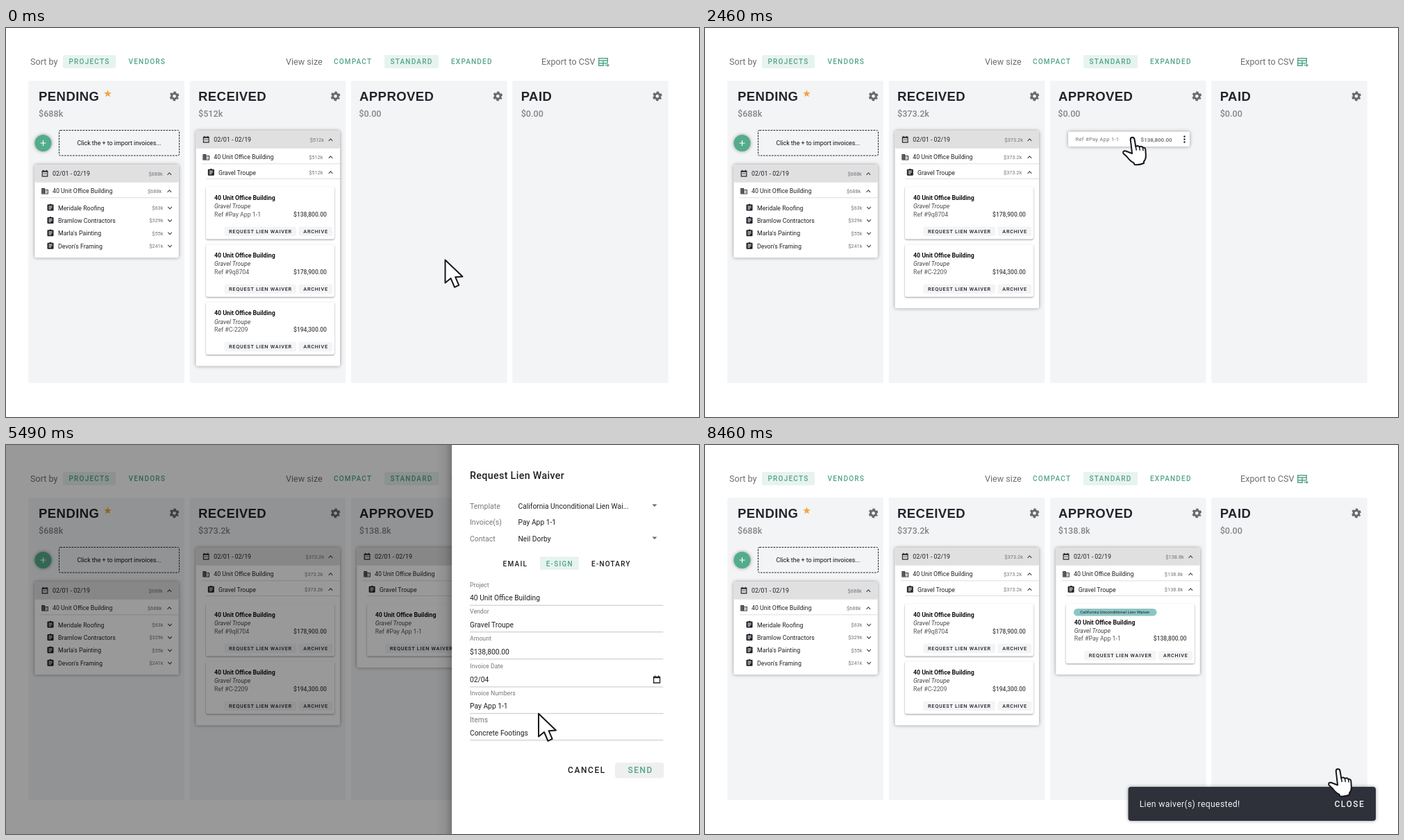
Write an HTML page that moves like this. It is 998 px wide and 561 px high and loops after 8580 ms.

```html
<!DOCTYPE html>
<html lang="en">
<head>
<meta charset="utf-8">
<title>Invoice board</title>
<style>
  html, body { margin: 0; width: 100%; height: 100%; overflow: hidden; background: #fff; }
  svg { display: block; width: 998px; height: 561px; font-family: Roboto, Arial, sans-serif; }
  text { white-space: pre; }
  .head { font-family: "Liberation Sans", Arial, sans-serif; }
  .lift { filter: drop-shadow(0 .5px 2.5px #0006); }
  .card { filter: drop-shadow(0 1px 1px #0006); }
</style>
</head>
<body>
<svg id="stage" viewBox="0 0 998 561"></svg>
<script>
const LOOP = 8580, GREEN = '#52a584', INK = '#202126', GRAY = '#85868a', DIM = '#747579';
const CREW = 'Gravel Troupe', PROJECT = '40 Unit Office Building';

// y is the middle of the capitals
const text = (x, y, s, size, fill = INK, attrs = '') =>
  `<text x="${x}" y="${y + size * .355}" font-size="${size}" fill="${fill}" ${attrs}>${s}</text>`;
const medium = 'font-weight="500"', bold = 'font-weight="700"', end = 'text-anchor="end"';
const caps = (x, y, s, size, fill, gap) =>
  text(x, y, s, size, fill, `${medium} letter-spacing="${gap}"`);
const rect = (x, y, w, h, fill, attrs = '') =>
  `<rect x="${x}" y="${y}" width="${w}" height="${h}" fill="${fill}" ${attrs}/>`;
const path = (d, stroke, width = 1, attrs = '') =>
  `<path d="${d}" fill="none" stroke="${stroke}" stroke-width="${width}" ${attrs}/>`;
const group = (id, body, attrs = '') => `<g id="${id}" ${attrs}>${body}</g>`;

// Icons live on a 24 unit grid
const icon = (x, y, size, body) =>
  `<g transform="translate(${x - size / 2} ${y - size / 2}) scale(${size / 24})">${body}</g>`;
const calendar = (x, y) => icon(x, y, 11.5,
  path('M4 5h16v16H4zM4 7h16M7 2v4M17 2v4M7 13h2.2m1.6 0h2.2m1.6 0h2.2', INK, 2.4));
const building = (x, y) => icon(x, y, 11.5,
  `<path d="M2 3h10v4h10v14H2z" fill="${INK}"/>` + rect(12, 9, 8, 10, '#fff') +
  path('M5 5v15M9 5v15', '#fff', 2, 'stroke-dasharray="2"') +
  path('M12 12h2m-2 4h2m2-4h2m-2 4h2', INK, 2));
const clipboard = (x, y) => icon(x, y, 12,
  rect(3, 3, 18, 18, INK, 'rx="2"') + `<circle cx="12" cy="4" r="3" fill="${INK}"/>` +
  path('M7 8h10M7 12h10M7 16h7', '#fff', 2));
const chevron = (x, y, dir = 1) =>
  path(`M${x - 2.8} ${y + 1.5 * dir}l2.8 ${-3 * dir}l2.8 ${3 * dir}`, '#44454a', 1.1);
const gear = x =>
  `<circle cx="${x}" cy="98.3" r="3.9" fill="none" stroke="#696a6d" stroke-width="3"/>` +
  `<circle cx="${x}" cy="98.3" r="5.6" fill="none" stroke="#696a6d" stroke-width="2.6"
    stroke-dasharray="3.2 2.664" stroke-dashoffset="1.6" transform="rotate(30 ${x} 98.3)"/>`;
const star = (x, y, r) => {
  const points = Array.from({ length: 10 }, (_, i) => {
    const a = i * Math.PI / 5, k = i % 2 ? r * .42 : r;
    return `${x + k * Math.sin(a)},${y - k * Math.cos(a)}`;
  });
  return `<polygon points="${points.join(' ')}" fill="#f3a640"/>`;
};

function toolbar() {
  const label = (x, s) => text(x, 48.6, s, 12.6, '#6d6e72');
  const option = (x, s) => caps(x, 48.8, s, 10, GREEN, 1.22);
  return label(35, 'Sort by') + rect(82, 39, 76, 19, '#e7f3ef', 'rx="2"') +
    option(90.5, 'PROJECTS') + option(176.5, 'VENDORS') +
    label(403, 'View size') + option(472, 'COMPACT') +
    rect(545, 39, 78, 19, '#e7f3ef', 'rx="2"') +
    option(553.5, 'STANDARD') + option(641, 'EXPANDED') + label(771, 'Export to CSV') +
    path('M861 54.3h-7.3v-10.6h12.6v6.5M853.7 47h12.6M853.7 50.7h12.6M860 47v7', GREEN, 1.4) +
    path('M862.5 53.7h5.5m-2-2l2 2l-2 2', GREEN, 1.2);
}

function column(x, titleX, gearX, title) {
  return rect(x, 76, 224.5, 436, '#f3f4f6', 'rx="2"') +
    text(titleX, 98.7, title, 18.5, '#24252c', `class="head" ${bold} letter-spacing=".45"`) + gear(gearX);
}
const sum = (x, s) => text(x, 123.6, s, 12.6, GRAY, medium);

// White panel with its date header and project row
function box(x, y, h, total) {
  const amount = (dx, cy) => text(x + dx, cy, total, 7.4, DIM, end);
  return rect(x, y, 207.5, h, '#fff', 'rx="2.5" class="lift"') +
    rect(x, y, 207.5, 25.5, '#e0e0e0', 'rx="2"') +
    calendar(x + 14.7, y + 12.3) + text(x + 25.7, y + 13, '02/01 - 02/19', 8.85) +
    amount(184.5, y + 13) + chevron(x + 194, y + 13) +
    building(x + 14.7, y + 38) + text(x + 25.7, y + 38, PROJECT, 8.8) +
    amount(183, y + 38) + chevron(x + 194, y + 38) +
    path(`M${x + 8} ${y + 47.5}h199.5`, '#dcdddf');
}

function pending() {
  const vendors = [['Meridale Roofing', '$63k'], ['Bramlow Contractors', '$329k'],
    ["Marla's Painting", '$55k'], ["Devon's Framing", '$241k']];
  return sum(47, '$688k') + star(146.5, 94.8, 5.6) +
    '<circle cx="53.5" cy="166" r="12" fill="#53ac8b" class="lift"/>' +
    path('M49.5 166h8M53.5 162v8', '#fff', 1.2) +
    rect(76.5, 147.5, 173, 36.5, 'none', 'rx="2" stroke="#222" stroke-dasharray="2.6 1.4"') +
    text(102.5, 165.8, 'Click the + to import invoices...', 8.85, '#111') +
    box(41.3, 197.3, 134, '$688k') +
    vendors.map(([name, amount], i) => {
      const y = 259.4 + i * 18.35;
      return clipboard(64, y - .3) + text(75, y, name, 8.8) +
        text(226.5, y, amount, 7.4, DIM, end) + chevron(236, y, -1);
    }).join('');
}

function invoice(y, ref, amount, tag) {
  const d = tag ? 10.5 : 0;
  return rect(288, y, 185, 75.5 + d, '#fff', 'rx="2.5" class="card"') +
    (tag ? rect(531 - 231.8, y + 7, 119.5, 10.5, '#8cc5c4', 'rx="5.2"') +
      text(308.5, y + 12.2, 'California Unconditional Lien Waiver', 6.25) : '') +
    text(300, y + 16 + d, PROJECT, 8.7, '#111', bold) +
    text(300, y + 28 + d, CREW, 8.8, '#444', 'font-style="italic"') +
    text(300, y + 39.5 + d, ref, 8.75, '#55565a') +
    text(461.8, y + 39.5 + d, amount, 8.5, '#444', `${medium} ${end}`) +
    rect(314.5, y + 57.5 + d, 103.5, 13.5, '#f3f4f6', 'rx="2"') +
    caps(321, y + 64.4 + d, 'REQUEST LIEN WAIVER', 7.3, INK, .74) +
    rect(421.5, y + 57.5 + d, 48.5, 13.5, '#f3f4f6', 'rx="2"') +
    caps(428.3, y + 64.4 + d, 'ARCHIVE', 7.3, INK, .74);
}

const FIRST = ['Ref #Pay App 1-1', '$138,800.00'];
const REST = [['Ref #9q8704', '$178,900.00'], ['Ref #C-2209', '$194,300.00']];

function stack(id, dx, total, invoices, tag) {
  return group(id, sum(277, total) +
    box(273.5, 148.3, 89.5 + 83.2 * invoices.length + (tag ? 10 : 0), total) +
    clipboard(295.3, 208.2) + text(306, 208.5, CREW, 8.8) +
    text(456.5, 208.5, total, 7.4, DIM, end) + chevron(467.5, 208.3) +
    path('M288 217.5h193', '#dcdddf') +
    invoices.map(([ref, amount], i) => invoice(229 + i * 83.2, ref, amount, tag)).join(''),
    `transform="translate(${dx} 0)"`);
}

const dragged = group('drag', rect(-92.5, -8, 175, 21.5, '#fff', 'rx="2" class="lift"') +
  text(-82, 3.2, FIRST[0], 7.7, '#777', 'letter-spacing=".25"') +
  text(57, 3.2, FIRST[1], 8, '#666', `${medium} ${end}`) +
  [-1, 3, 7].map(y => `<circle cx="75" cy="${y}" r="1.2" fill="${INK}"/>`).join(''));

function drawer() {
  const row = (y, label, value, arrow) => text(668, y, label, 10.5, '#77787c') +
    text(737.5, y + .5, value, 10.3) +
    (arrow ? `<path d="M930.5 ${y - 2.5}h7l-3.5 3.5z" fill="#66676b"/>` : '');
  const field = (y, label, value, size = 8.75) => text(668, y, label, size, '#77787c') +
    text(668, y + 19, value, 10.3) + path(`M668 ${y + 29.7}h278.5`, '#c4c5c7');
  return rect(618, 0, 24, 561, 'url(#edge)') + rect(642, 0, 357, 561, '#fff') +
    text(668, 44, 'Request Lien Waiver', 14.3, INK, `${medium} letter-spacing=".32"`) +
    row(88, 'Template', 'California Unconditional Lien Wai...', true) +
    row(110.8, 'Invoice(s)', 'Pay App 1-1') + row(135, 'Contact', 'Neil Dorby', true) +
    rect(769, 161, 56, 19, '#e7f3ef', 'rx="2"') +
    caps(715.5, 171, 'EMAIL', 10, INK, 1.25) + caps(777.7, 171, 'E-SIGN', 10, GREEN, 1.25) +
    caps(843, 171, 'E-NOTARY', 10, INK, 1.25) +
    field(201.5, 'Project', PROJECT) + field(240, 'Vendor', CREW) +
    field(279, 'Amount', '$138,800.00') + field(319.2, 'Invoice Date', '02/04') +
    field(357.5, 'Invoice Numbers', 'Pay App 1-1') + field(396, 'Items', 'Concrete Footings', 10.3) +
    path('M932.7 334.5h9v8.5h-9zM932.7 335.5h9M934.7 332.5v2M939.7 332.5v2', INK, 1.3) +
    caps(809, 469, 'CANCEL', 12, INK, 1.55) + rect(877, 458, 70.5, 22.5, '#efeff0', 'rx="4"') +
    caps(895.5, 469, 'SEND', 12, GREEN, 1.5);
}

const toast = rect(609.5, 493, 356.5, 49, '#2e303a', 'rx="4" class="lift"') +
  text(625.7, 518, 'Lien waiver(s) requested!', 12.2, '#f2f2f4', 'letter-spacing=".35"') +
  caps(906.5, 518, 'CLOSE', 12, '#f2f2f4', 1.5);

const outline = `fill="#fff" stroke="#17171c" stroke-width="2" stroke-linejoin="round"`;
const pointer = `<path id="arrow" d="M1 1V34L9 27.5L14.5 40.3L20.7 37.4L15.6 25.7L26 25Z" ${outline}/>` +
  group('hand', `<path d="M-2.8 3.5C-3-.8 2.4-1 3 3L4.8 13.5Q8 11.3 10 14Q13.5 12.2 15 15Q18.6 14.4
    18.9 18L19.4 27Q19.4 32 16.5 35V37.5Q10 40.5 3 39.5L2 37Q-3.5 34.5-7.5 28.5L-13 23.5
    Q-14.6 19.5-10 19.7L-.4 23.5Z" ${outline}/>` +
    path('M4.8 13.5l.9 5M10 14l.7 4.5M15 15l.5 4', '#17171c', 1.5, 'stroke-linecap="round"'));

const stage = document.getElementById('stage');
stage.innerHTML = `<defs><linearGradient id="edge"><stop offset="0" stop-opacity="0"/>
    <stop offset=".6" stop-opacity=".06"/><stop offset="1" stop-opacity=".22"/></linearGradient></defs>` +
  rect(0, 0, 998, 561, '#fff') + toolbar() +
  column(32.3, 47, 242.5, 'PENDING') + column(264.8, 277, 474.5, 'RECEIVED') +
  column(497, 509, 708.3, 'APPROVED') + column(729.3, 741.7, 938, 'PAID') +
  pending() + sum(741.7, '$0.00') + group('zero', sum(508.3, '$0.00')) +
  stack('three', 0, '$512k', [FIRST, ...REST]) + stack('two', 0, '$373.2k', REST) +
  stack('plain', 231.8, '$138.8k', [FIRST]) + stack('tagged', 231.8, '$138.8k', [FIRST], true) +
  dragged + rect(0, 0, 998, 561, '#000', 'id="shade"') +
  group('drawer', drawer()) + group('toast', toast) + group('cursor', pointer);

const el = id => document.getElementById(id);
const ramp = (t, a, b) => Math.min(1, Math.max(0, (t - a) / (b - a)));
const ease = (t, a, b) => { const p = ramp(t, a, b); return p * p * (3 - 2 * p); };
const fade = (id, value) => {
  el(id).setAttribute('opacity', value);
  el(id).setAttribute('visibility', +value ? 'visible' : 'hidden');
};
const move = (id, x, y) => el(id).setAttribute('transform', `translate(${x} ${y})`);

// Cursor legs: start time, end time, destination
const START = [631.5, 333.5];
const LEGS = [[100, 1050, 387, 260.5], [1740, 2400, 615.5, 157.5], [2700, 3150, 645, 336],
  [3180, 3500, 600.5, 292.5], [4650, 5250, 766, 386.5], [5550, 6090, 911.5, 467]];
const HAND = [[960, 2700], [3400, 4650], [6000, LOOP]];

function cursorAt(t) {
  let [x, y] = START;
  for (const [a, b, toX, toY] of LEGS) {
    const p = ease(t, a, b);
    x += (toX - x) * p;
    y += (toY - y) * p;
  }
  return [x, y];
}

function draw(t) {
  const [x, y] = cursorAt(t);
  const isHand = HAND.some(([a, b]) => t >= a && t < b);
  move('cursor', x, y);
  fade('hand', +isHand);
  fade('arrow', +!isHand);

  fade('three', 1 - ramp(t, 1485, 1740));
  fade('two', ramp(t, 1740, 1980));
  move('drag', x, y);
  fade('drag', ramp(t, 1350, 1500) * (1 - ramp(t, 2640, 2760)));
  fade('zero', 1 - ramp(t, 2640, 2760));
  fade('plain', t < 7110 ? ramp(t, 2700, 2940) : 0);
  fade('tagged', +(t >= 7110));

  const open = ease(t, 4380, 4900) - ease(t, 6450, 6930);
  move('drawer', (1 - open) * 390, 0);
  fade('shade', .4 * (ramp(t, 4380, 4860) - ramp(t, 6600, 7110)));
  move('toast', 0, 75 * (1 - ease(t, 7140, 7560)));
  fade('toast', +(t > 7140));
}

const began = performance.now();
function tick() {
  draw((performance.now() - began) % LOOP);
  requestAnimationFrame(tick);
}
tick();
</script>
</body>
</html>
```
